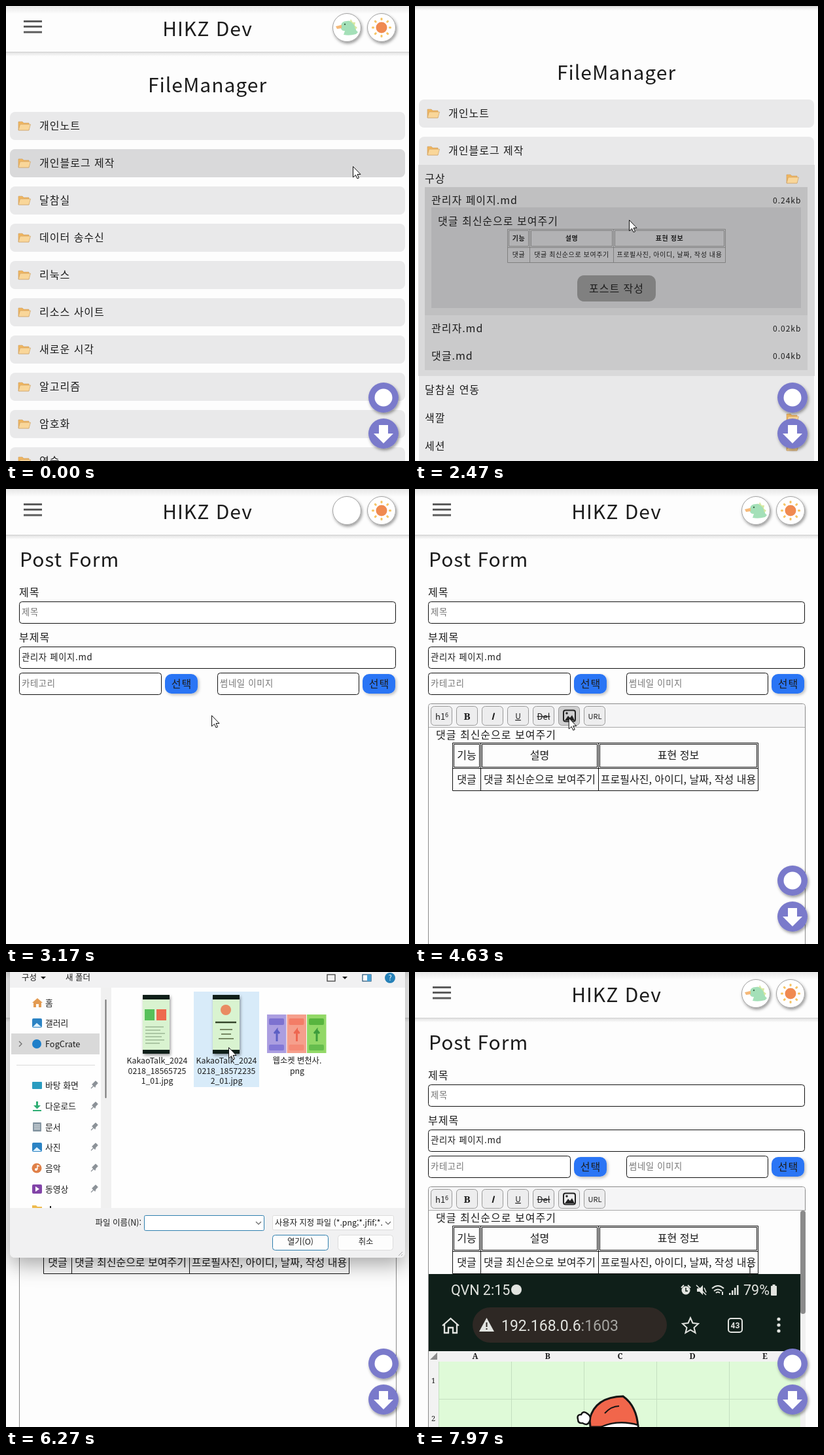
Recreate the animation shown at these times as an HTML page. Size 616 by 696 pixels, loop 8000 ms.

```html
<!DOCTYPE html>
<html lang="ko">
<head>
<meta charset="utf-8">
<style>
html, body { margin: 0; width: 100%; height: 100%; overflow: hidden; background: #fdfdfd; }
svg { display: block; }
text { font-family: "Noto Sans CJK KR", "Noto Sans", sans-serif; white-space: pre; }
</style>
</head>
<body>
<svg id="stage" width="616" height="696" viewBox="0 0 616 696"></svg>
<script>
const stage = document.getElementById('stage');
const INK = '#1c1c1c', PAGE = '#fdfdfd', ROW = '#e9e9ea', HOVER = '#d9d9da', GREY = '#757575';

// Markup helpers
const text = (x, y, s, size = 16, extra = '') =>
  `<text x="${x}" y="${y}" font-size="${size}" fill="${INK}" ${extra}>${s}</text>`;
const wide = (x, y, s, size = 16, extra = '') => text(x, y, s, size, 'letter-spacing="1" ' + extra);
const mid = 'text-anchor="middle"';
const roboto = 'style="font-family:Roboto,sans-serif"', serif = `style="font-family:'Noto Serif',serif"`;
const rect = (x, y, w, h, fill, extra = '') =>
  `<rect x="${x}" y="${y}" width="${w}" height="${h}" fill="${fill}" ${extra}/>`;
const circle = (x, y, r, fill, extra = '') => `<circle cx="${x}" cy="${y}" r="${r}" fill="${fill}" ${extra}/>`;
const path = (d, fill = 'none', extra = '') => `<path d="${d}" fill="${fill}" ${extra}/>`;
const line = (d, color, w = 1) => path(d, 'none', `stroke="${color}" stroke-width="${w}"`);
const group = (id, body, extra = '') => `<g id="${id}" ${extra}>${body}</g>`;
const at = (x, y, body) => `<g transform="translate(${x} ${y})">${body}</g>`;

const folder = (x, y) => at(x, y,
  path('M1 14V1h6l2 2h8v11z', '#f0b660', 'stroke="#c99a5c" stroke-width=".6"') +
  path('M1 14L3.500 5H19.500L17 14z', '#f9d699', 'stroke="#c99a5c" stroke-width=".6"'));

// File list
const row = (y, name) => rect(6, y, 604, 43, ROW, 'rx="8"') + folder(18, y + 14) + wide(51, y + 27, name);
const below = ['달참실', '데이터 송수신', '리눅스', '리소스 사이트', '새로운 시각', '알고리즘', '암호화', '연습'];
const items = ['달참실 연동', '색깔', '세션', '웹소켓 페이로드', '유저 친화적 기능', '테이블', '필요기술', '환경마다 다른 링크', 'javaDoc', '회의록', '배포', '정리'];
const noIcon = ['필요기술', 'javaDoc'];
const SUB = 13 * 43, FILES = 126, PREVIEW = 154;

function table(xs, ys, size, color, boldHead, spacing) {
  const [l, a, b, r] = xs, [top, m, bottom] = ys;
  const box = (x1, y1, x2, y2) => `M${x1} ${y1}H${x2}V${y2}H${x1}z`;
  const heads = ['기능', '설명', '표현 정보'], cells = ['댓글', '댓글 최신순으로 보여주기', '프로필사진, 아이디, 날짜, 작성 내용'];
  const base = (y1, y2) => (y1 + y2) / 2 + size * .36;
  let out = line(box(l, top, r, bottom) + `M${l} ${m + 1}H${r}M${a} ${top}V${bottom}M${b} ${top}V${bottom}` +
    box(l + 2, top + 2, a - 2, m - 1) + box(a + 2, top + 2, b - 2, m - 1) + box(b + 2, top + 2, r - 2, m - 1), color);
  [[l, a], [a, b], [b, r]].forEach(([p, q], i) => {
    const x = (p + q) / 2, ls = `${mid} letter-spacing="${spacing}"`;
    out += text(x, base(top, m), heads[i], size, ls + (boldHead ? ' font-weight="700"' : '')) +
      text(x, base(m, bottom), cells[i], size, ls);
  });
  return out;
}

const files = rect(15, 296, 585, 280, '#cacacb') +
  rect(15, 296, 585, 42, '#c0c0c1', 'id="openFile"') +
  `<svg id="previewClip" x="0" y="327" width="616" height="0">` + at(0, -327,
    rect(25, 327, 565, 154, '#b2b2b4') + wide(35, 354, '댓글 최신순으로 보여주기') +
    table([141.5, 175.5, 303.5, 474.5], [360.5, 387.5, 411.5], 10, '#808080', true, .6) +
    rect(248, 431, 120, 40, '#808080', 'rx="10"') + wide(308, 457, '포스트 작성', 16, mid)) + '</svg>' +
  wide(25, 322, '관리자 페이지.md') + wide(547, 321, '0.24kb', 12) +
  group('otherFiles', wide(25, 364, '관리자.md') + wide(547, 363, '0.02kb', 12) +
    wide(25, 406, '댓글.md') + wide(547, 405, '0.04kb', 12));

const list = wide(308, 132, 'FileManager', 30, mid) + row(162, '개인노트') +
  rect(6, 219, 604, 43, ROW, 'id="folderBox" rx="8"') +
  rect(6, 219, 604, 43, HOVER, 'id="folderHover" rx="8"') +
  folder(18, 233) + wide(51, 246, '개인블로그 제작') +
  `<svg id="subClip" x="0" y="262" width="616" height="0">` + at(0, -262,
    rect(5, 262, 606, 43, HOVER, 'id="itemHover"') + wide(15, 289, '구상') + folder(567, 276) +
    `<svg id="filesClip" x="0" y="296" width="616" height="0">` + at(0, -296, files) + '</svg>' +
    group('restItems', items.map((s, i) => wide(15, 332 + 43 * i, s) +
      (noIcon.includes(s) ? '' : folder(567, 319 + 43 * i))).join(''))) + '</svg>' +
  group('below', below.map((s, i) => row(276 + 57 * i, s)).join(''));

// Header
const rays = Array.from({ length: 8 }, (_, i) =>
  `<rect x="-1.500" y="-15" width="3" height="4" rx="1" fill="#f6c565" transform="rotate(${i * 45})"/>`).join('');
const roundButton = x => circle(x, 33, 21.500, '#fff', 'stroke="#a2a2a2" filter="url(#drop)"');
const dino = path('M512 30q1-7 9-7q6-1 10 4q4 4 4 10l3 3-3 3q-10 3-19 1l2-6q-7 1-6-8z', '#a4e0b8') +
  path('M523 22l3 1 1-3 3 5 4 0-1 5 4 3-3 3q-1-10-11-14z', '#d8e8a0') + path('M504 31l9-2v5l-7 1z', '#f5b878') +
  circle(518, 28, 1.200, '#3d6b4b');
const header = rect(0, 0, 616, 70, PAGE) + rect(0, 0, 616, 12, 'url(#topGlow)') +
  rect(0, 70, 616, 7, 'url(#underGlow)') + line('M0 70.500H616', '#cfcfcf') +
  `<g filter="url(#soft)">` + line('M27 23.500H55M27 31.500H55M27 40H55', '#5c5c5c', 3.200) + '</g>' +
  wide(308, 46, 'HIKZ Dev', 30, mid) + roundButton(521) + roundButton(574) + group('dino', dino) +
  at(574, 33, rays + circle(0, 0, 8.500, '#f08a50'));

// Post form
const field = (x, y, w, s, color) => rect(x + .5, y + .5, w - 1, 33, '#fff', 'rx="4" stroke="#111"') +
  `<text x="${x + 4}" y="${y + 21}" font-size="13.300" letter-spacing=".7" fill="${color}">${s}</text>`;
const pick = x => rect(x, 283, 50, 30, '#2b75f5', 'rx="10" filter="url(#glow)"') + wide(x + 25.500, 304, '선택', 16, mid);
const form = wide(21, 119, 'Post Form', 30) + wide(20, 164, '제목') + field(20, 172, 576, '제목', GREY) +
  wide(20, 233, '부제목') + field(20, 241, 576, '관리자 페이지.md', INK) +
  field(20, 281, 218, '카테고리', GREY) + pick(243) + field(323, 281, 217, '썸네일 이미지', GREY) + pick(545);

const TOOL = '#ededee';
const tool = i => rect(24.500 + 39 * i, 332.500, 32, 29, TOOL, `rx="5" stroke="#999" ${i == 5 ? 'id="imageTool"' : ''}`);
const tools = [0, 1, 2, 3, 4, 5, 6].map(tool).join('') +
  text(31, 353, 'h1<tspan font-size="9" dy="-4">6</tspan>', 13) +
  text(79.500, 353, 'B', 15, mid + ' font-weight="700" ' + serif) +
  text(118.500, 353, 'I', 14, mid + ' font-style="italic" font-weight="700"') +
  text(157.500, 352, 'U', 12, mid + ' text-decoration="underline"') +
  text(196.500, 353, 'Del', 13, mid + ' text-decoration="line-through"') +
  rect(227, 338.500, 18, 17, 'none', 'rx="3" stroke="#222" stroke-width="2"') +
  path('M229 354l5-7 3 3 3-4 4 8z', '#222') + circle(232, 343, 1.700, '#222') +
  text(275, 352, 'URL', 11, mid);

// Inserted picture
const NIGHT = '#0f1f19', LIGHT = '#e2e4e0';
const phoneText = (x, y, s, size, extra = '') =>
  `<text x="${x}" y="${y}" font-size="${size}" fill="${LIGHT}" ${roboto} ${extra}>${s}</text>`;
const picture = rect(21, 462, 568, 118, NIGHT) +
  phoneText(55, 494, 'QVN 2:15', 21.500) + phoneText(502, 494, '79%', 21.500) + circle(155, 486, 8, LIGHT) +
  circle(414, 487, 6.500, LIGHT) + line('M414 483V488H417', NIGHT, 1.500) + line('M407 483l4-4M421 483l-4-4', LIGHT, 2) +
  path('M431 484h4l5-5v15l-5-5h-4z', LIGHT) + line('M430 479L445 494M442 483l3 7', LIGHT, 1.500) +
  line('M454 484q9-8 18 0M457 488q6-5 12 0M460 491q3-3 6 0M470 489v5', LIGHT, 2) +
  [0, 1, 2, 3].map(i => rect(480 + 4 * i, 491 - 4 * i, 2.500, 3 + 4 * i, LIGHT)).join('') +
  rect(544, 480, 9, 15, LIGHT, 'rx="1"') + rect(546.500, 478, 4, 3, LIGHT) +
  rect(88, 513, 297, 54, '#2e2824', 'rx="27"') +
  path('M98 550l11.500-21L121 550z', LIGHT) + line('M109.500 536v7M109.500 545v2', '#2e2824', 2) +
  phoneText(132, 549, '192.168.0.6<tspan fill="#a6a6a2">:1603</tspan>', 23) +
  line('M42 541L54.500 530 67 541M45 539V552H51V544H58V552H64V539', LIGHT, 2.300) +
  line('M421 529l3.500 8 8.500 1-6.500 6 2 8-7.500-4.500-7.500 4.500 2-8-6.500-6 8.500-1z', LIGHT, 2) +
  rect(479, 530, 21, 21, 'none', `rx="4" stroke="${LIGHT}" stroke-width="2"`) +
  phoneText(489.500, 545, '43', 12, mid + ' font-weight="700"') +
  [531, 540, 549].map(y => circle(556, y, 2.600, LIGHT)).join('') +
  rect(21, 580, 568, 116, '#dffad8') + rect(21, 580, 568, 16, '#f2f2f2') + rect(21, 580, 15, 116, '#f2f2f2') +
  path('M23 593L34 582V593z', '#8c8c8c') +
  [...'ABCDE'].map((c, i) => text(92 + 110.700 * i, 592, c, 12, mid + ' font-weight="700" ' + serif)).join('') +
  [1, 2].map(n => text(28, 571 + 58 * n, n, 11, mid + ' ' + serif)).join('') +
  line('M147.500 596V696M258.500 596V696M369.500 596V696M480.500 596V696M36 653.500H589M36.500 596V696', '#c4dfc0') +
  path('M267 684Q275 650 318 649Q339 664 341 696H268z', '#f1664b', 'stroke="#151515" stroke-width="3"') +
  line('M290 675Q300 664 312 664', '#151515', 2) +
  path('M264 676q-7-6-10 1q-7 0-5 7q0 7 7 6q8 5 11-3q3-7-3-11z', '#fff', 'stroke="#151515" stroke-width="2.500"') +
  path('M276 700Q306 683 341 693V700z', '#fff', 'stroke="#151515" stroke-width="2.500"');

const editor = rect(20.500, 328.500, 576, 420, PAGE, 'rx="4" stroke="#8a8a8a"') +
  rect(21, 329, 575, 35, '#f5f5f6', 'rx="4"') + line('M21 364.500H596', '#a8a8a8') + tools +
  wide(32, 382, '댓글 최신순으로 보여주기') +
  table([57.500, 100.500, 280.500, 524.500], [388.500, 426.500, 461.500], 16, '#111', false, 0) +
  group('picture', picture + rect(589, 365, 8, 331, '#f1f1f1') + rect(589, 365, 8, 158, '#8b8b8b', 'rx="4"'));

// Floating buttons
const floats = [599, 654].map(y => circle(577, y, 23, '#7a7acb', 'filter="url(#drop)"')).join('') +
  circle(577, 599, 13.500, '#fff') + path('M570 641H584V654H592L577 669 562 654H570z', '#fff');

// File dialog
const places = [[47, '홈', '#e39b52'], [78, '갤러리', '#2b83c4'], [110, 'FogCrate', '#1f7fc9'], [173, '바탕 화면', '#2a9cc0'],
  [205, '다운로드', '#2fae74'], [237, '문서', '#8797a3'], [268, '사진', '#2b83c4'], [300, '음악', '#e08048'], [332, '동영상', '#8244a8']];
const photoIcon = (y, c) => rect(40, y - 7, 15, 14, c, 'rx="2"') + path(`M41 ${y + 6}l6-6 7 6z`, '#dff2ff');
const icon = (y, i, c) => [
  path(`M40 ${y}l8-7 8 7h-2v7h-4v-5h-4v5h-4v-7z`, c),
  photoIcon(y, c),
  circle(47, y, 7, c),
  rect(40, y - 5, 15, 11, c, 'rx="1"'),
  path(`M46 ${y - 7}h3v6h4l-5.500 5.500-5.500-5.500h4zM41 ${y + 6}h13v2h-13z`, c),
  rect(41, y - 7, 13, 14, c, 'rx="1"') + line(`M43 ${y - 3}h9M43 ${y}h9M43 ${y + 3}h9`, '#fff'),
  photoIcon(y, c),
  circle(47, y, 7.500, c) + circle(46, y + 2, 2, '#fff') + line(`M48 ${y + 2}v-6l3 1`, '#fff', 1.400),
  rect(40, y - 7, 15, 14, c, 'rx="2"') + path(`M45 ${y - 4}l6 4-6 4z`, '#fff')][i];
const pin = y => at(135, y, path('M-5 5l4-4M-3-1l4 4 1-3 3-3-3-3-3 3z', '#8c9298', 'stroke="#8c9298" stroke-width="1.200"'));
const lines = (x, ss) => ss.map((s, i) => text(x, 140 + 15.500 * i, s, 12.300, mid)).join('');
const phone = x => rect(x, 35, 41, 90, '#d9f3d0', 'filter="url(#drop)"') + rect(x, 35, 41, 7, NIGHT) + rect(x, 119, 41, 6, NIGHT);
const thumbs = phone(209) + rect(212, 57, 15, 17, '#57c05a') + rect(230, 57, 15, 17, '#ee6a4e') +
  line('M213 84H241M213 89H236M213 94H243M213 99H238M213 104H242M213 109H235', '#7f9a78') +
  phone(316) + circle(336, 58, 8, '#e98b62') + line('M320 77H352', '#34452a', 2.500) +
  line('M327 88H346M329 95H344M325 102H348', '#55663f', 1.500) +
  ['#ab9ee0', '#f59f8c', '#92d867'].map((c, i) => rect(399 + 30.500 * i, 65, 29.500, 59, c) +
    rect(402 + 30.500 * i, 71, 23, 10, ['#7d72d0', '#f37d67', '#58b53f'][i], 'rx="2"') +
    line(`M${414 + 30.500 * i} 106V89l-4 5m4-5l4 5`, ['#5c5fc4', '#ee6650', '#3d9c3c'][i], 3) +
    rect(402 + 30.500 * i, 111, 23, 9, ['#8378d6', '#f48a76', '#66bd4d'][i], 'rx="2"')).join('');
const chevron = x => line(`M${x} 382l4 4 4-4`, '#666', 1.200);
const dialog = rect(6, -60, 604, 497, '#f1f1f2', 'rx="8" filter="url(#deep)"') + rect(6, 24, 604, 337, '#fefefe') +
  text(24, 13, '구성', 12.500) + path('M53 7h8l-4 4z', INK) + text(91, 13, '새 폴더', 12.500) +
  rect(491, 4, 12, 10, 'none', 'stroke="#333" stroke-width="1.200"') + path('M514 7h8l-4 4z', INK) +
  rect(545, 4, 13, 10, '#fff', 'stroke="#1d4f75" stroke-width="1.200"') + rect(552, 4, 6, 10, '#47a0d4') +
  circle(587, 9, 8, '#2681b8') + `<text x="587" y="13" font-size="11" fill="#fff" ${mid}>?</text>` +
  rect(8, 94, 135, 32, '#d9d9d9') + line('M20 106l4 4-4 4', '#707070', 1.300) + line('M16 142.500H136', '#dadada') +
  rect(145, 24, 16, 337, '#f0f0f0') + rect(151.500, 42, 2, 151, '#757575', 'rx="1"') +
  places.map(([y, s, c], i) => icon(y, i, c) + text(60, y + 4.500, s, 12.800) + (i > 2 ? pin(y) : '')).join('') +
  path('M40 361v-4h6l2 2h7v2z', '#eebb4e') + rect(67, 358, 2, 3, INK) +
  rect(287, 30, 100, 146, '#d8ebf9', 'id="chosen"') + thumbs +
  lines(231, ['KakaoTalk_2024', '0218_18565725', '1_01.jpg']) + lines(337, ['KakaoTalk_2024', '0218_18572235', '2_01.jpg']) +
  lines(445, ['웹소켓 변천사.', 'png']) +
  text(207, 388, '파일 이름(N):', 12.500, 'text-anchor="end"') +
  rect(211.500, 372.500, 183, 23, '#fff', 'rx="2" stroke="#2f7fae"') + chevron(382) +
  group('caret', line('M215.500 377V392', '#111')) + group('fileName', text(215, 388, 'KakaoTalk_20240218_185722', 12)) +
  rect(407.500, 372.500, 185, 22, '#fdfdfd', 'rx="2" stroke="#dcdcdc"') + text(411, 388, '사용자 지정 파일 (*.png;*.jfif;*.', 12.300) +
  chevron(580) +
  rect(407.500, 402.500, 85, 23, '#fdfdfd', 'rx="4" stroke="#2f7fae"') + text(450, 417, '열기(O)', 12.300, mid) +
  rect(507.500, 402.500, 84, 23, '#fdfdfd', 'rx="4" stroke="#dcdcdc"') + text(550, 417, '취소', 12.300, mid) +
  line('M600 434l6-6M604 434l2-2', '#a8a8a8');

const arrow = path('M.5.5V17L4.500 13.500 7 19 9.500 18 7 12.500H12z', '#fff', 'stroke="#111" stroke-width="1"');
const shade = (id, dx, dy, dev, op) =>
  `<filter id="${id}" x="-50%" y="-50%" width="200%" height="200%"><feDropShadow dx="${dx}" dy="${dy}" stdDeviation="${dev}" flood-color="#000" flood-opacity="${op}"/></filter>`;
const fade = (id, color) => `<linearGradient id="${id}" x2="0" y2="1"><stop stop-color="${color}"/><stop offset="1" stop-color="${color}" stop-opacity="0"/></linearGradient>`;

stage.innerHTML = '<defs>' + shade('drop', 1.500, 2.500, 2, .4) + shade('glow', 2, 2, 2, .25) +
  shade('deep', 0, 10, 16, .35) + fade('topGlow', '#e6e6e6') + fade('underGlow', '#dedede') +
  '<filter id="soft"><feGaussianBlur stdDeviation=".7"/></filter></defs>' +
  rect(0, 0, 616, 696, PAGE) + group('list', list) + group('form', form) + group('editor', editor) +
  group('header', header) + group('floats', floats) + group('dialog', dialog) +
  group('pointer', group('arrow', arrow) + group('busy', circle(0, 0, 8, '#fff', 'stroke="#1b76b5" stroke-width="5"')) +
    group('beam', line('M-3 0.500H3M0 0V16M-3 15.500H3', '#222', 1.200)));

const $ = Object.fromEntries([...stage.querySelectorAll('[id]')].map(e => [e.id, e]));
const set = (id, name, v) => $[id].setAttribute(name, v);
const show = (id, on) => set(id, 'display', on ? 'inline' : 'none');
const move = (id, x, y) => set(id, 'transform', `translate(${x} ${y})`);
const ramp = (t, a, b) => Math.min(1, Math.max(0, (t - a) / (b - a)));
const ease = (t, a, b) => { const p = ramp(t, a, b); return p * p * (3 - 2 * p); };

// Pointer stops: time, x, y
const stops = [[0, 530, 245], [350, 510, 247], [1000, 324, 286], [1300, 324, 286], [1650, 326, 310], [1950, 326, 317],
  [2300, 327, 327], [2480, 327, 327], [2700, 312, 425], [2880, 312, 425], [3150, 314, 346], [3350, 314, 346], [4100, 236, 350],
  [5000, 234, 350], [5350, 225, 362], [5500, 225, 362], [6250, 340, 115], [6980, 345, 117], [7500, 470, 370], [7850, 512, 450]];

function pointerAt(t) {
  let i = stops.length - 1;
  while (i > 0 && stops[i][0] > t) i--;
  const a = stops[i], b = stops[i + 1] || a, p = a === b ? 0 : ease(t, a[0], b[0]);
  return [a[1] + (b[1] - a[1]) * p, a[2] + (b[2] - a[2]) * p];
}

function draw(t) {
  const onForm = t >= 2880;
  show('list', !onForm);
  show('form', t >= 2980);
  show('editor', t >= 3230);
  show('floats', !onForm || t >= 3230);
  show('dino', !onForm || t >= 3230);

  const folderOpen = ease(t, 400, 720), filesOpen = ease(t, 1250, 1500), preview = ease(t, 1800, 2050);
  const extra = FILES * filesOpen + PREVIEW * preview;
  const subHeight = folderOpen * (SUB + extra);
  set('folderBox', 'height', 43 + subHeight);
  set('subClip', 'height', subHeight);
  set('filesClip', 'height', extra);
  set('openFile', 'height', 42 + PREVIEW * preview);
  set('previewClip', 'height', PREVIEW * preview);
  set('itemHover', 'height', 43 + extra);
  const [x, y] = pointerAt(t);
  show('folderHover', y < 262);
  show('itemHover', y >= 262);
  show('openFile', y >= 296);
  move('otherFiles', 0, PREVIEW * preview);
  move('restItems', 0, extra);
  move('below', 0, subHeight);
  move('list', 0, -19 * ease(t, 2150, 2300));
  move('header', 0, -70 * (ease(t, 2170, 2400) - ease(t, 2880, 3060)));

  const closing = ramp(t, 6900, 7055), opening = ease(t, 5080, 5240);
  const scale = opening < 1 ? .9 + .1 * opening : 1 - .1 * closing;
  show('dialog', opening > 0 && closing < 1);
  set('dialog', 'opacity', opening * (1 - closing) ** 2);
  set('dialog', 'transform', `translate(308 170) scale(${scale}) translate(-308 -170)`);
  show('chosen', t >= 6250);
  show('fileName', t >= 6500);
  show('caret', t < 6500 && t % 1060 < 530);
  set('imageTool', 'fill', t >= 4000 && t < 7100 ? '#cfcfd0' : TOOL);
  show('picture', t >= 7600);

  const busy = t >= 6880 && t < 7080, beam = t >= 7500;
  move('pointer', x, y);
  show('busy', busy);
  show('beam', beam);
  show('arrow', !busy && !beam);
}

function frame() {
  draw(performance.now() % 8000);
  requestAnimationFrame(frame);
}
frame();
</script>
</body>
</html>
```
